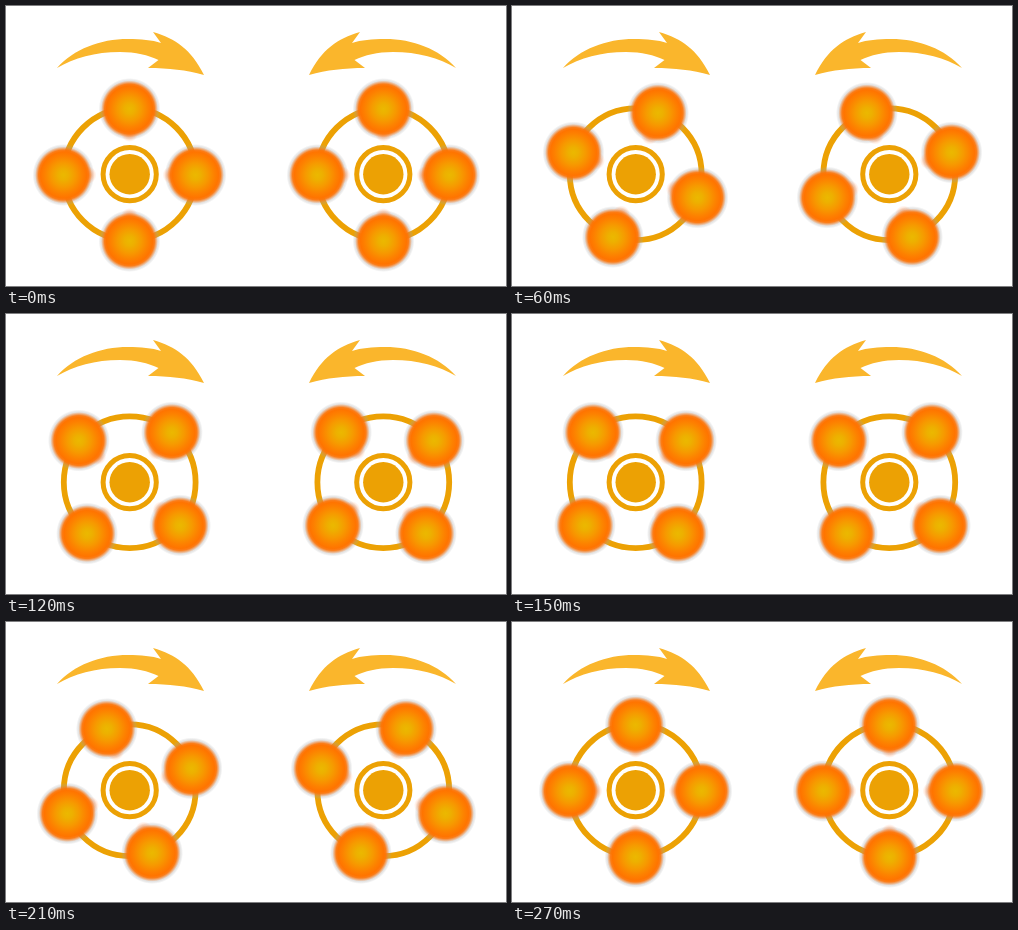
Recreate the animation shown at these times as an HTML page with a canvas. Size 500 px wide and 280 px high, loop 0.3 s.

```html
<!DOCTYPE html>
<html lang="en">
<head>
<meta charset="utf-8">
<title>Counter-rotating wheels</title>
<style>
html, body { margin: 0; width: 100%; height: 100%; overflow: hidden; background: #fff; }
canvas { display: block; }
</style>
</head>
<body>
<canvas id="stage" width="500" height="280"></canvas>
<script>
const ctx = document.getElementById('stage').getContext('2d');
const GOLD = '#eca104';
const STEP_MS = 30, STEPS = 10, STEP_ANGLE = Math.PI / 18;
const ORBIT = 66;

const arrow = new Path2D(
  'M51 62 C68 43 94 33 122 33 C135 33 146 34 155 37 L147 26 ' +
  'C170 33 185 43 198 69 C180 64 163 62 142 62 L152.5 54 ' +
  'C142 49 130 46 114 46 C89 46 68 52 51 62 Z');

function radial(radius, stops) {
  const gradient = ctx.createRadialGradient(0, 0, 0, 0, 0, radius);
  for (const [distance, color] of stops) gradient.addColorStop(distance / radius, color);
  return gradient;
}

const halo = radial(31, [
  [0, 'rgba(160,150,140,.4)'], [26, 'rgba(160,150,140,.4)'],
  [29, 'rgba(160,160,160,.25)'], [31, 'rgba(165,165,165,0)']
]);
const ball = radial(28.5, [
  [0, '#ebb800'], [5, '#edb000'], [12, '#f69a00'], [19, '#fd8000'],
  [23, '#ff7400'], [25, 'rgba(255,116,5,.9)'], [28.5, 'rgba(255,130,40,0)']
]);
const flare = radial(9, [
  [0, 'rgba(255,115,20,.65)'], [4, 'rgba(255,120,35,.4)'], [9, 'rgba(255,130,70,0)']
]);

function disc(x, y, radius, fill) {
  ctx.save();
  ctx.translate(x, y);
  ctx.beginPath();
  ctx.arc(0, 0, radius, 0, 2 * Math.PI);
  ctx.fillStyle = fill;
  ctx.fill();
  ctx.restore();
}

function ring(radius, width) {
  ctx.beginPath();
  ctx.arc(0, 0, radius, 0, 2 * Math.PI);
  ctx.lineWidth = width;
  ctx.strokeStyle = GOLD;
  ctx.stroke();
}

function drawWheel(angle) {
  ctx.fillStyle = '#fab62c';
  ctx.fill(arrow);
  ctx.translate(123.7, 168.2);
  ring(65.9, 5.8);
  ring(26.6, 5);
  disc(0, 0, 20.2, GOLD);
  ctx.translate(-0.2, 0.8);
  ctx.rotate(angle);
  for (let i = 0; i < 4; i++) {
    disc(0, -ORBIT, 31, halo);
    disc(0, -42, 9, flare);
    disc(0, -ORBIT, 28.5, ball);
    ctx.rotate(Math.PI / 2);
  }
}

function frame(now) {
  // The final step completes a quarter turn, so it matches the first pose.
  const angle = Math.floor(now / STEP_MS) % STEPS * STEP_ANGLE;
  ctx.fillStyle = '#fff';
  ctx.fillRect(0, 0, 500, 280);
  for (const mirrored of [false, true]) {
    ctx.save();
    if (mirrored) ctx.transform(-1, 0, 0, 1, 501, 0);
    drawWheel(angle);
    ctx.restore();
  }
  requestAnimationFrame(() => frame(performance.now() - start));
}

const start = performance.now();
frame(0);
</script>
</body>
</html>
```
